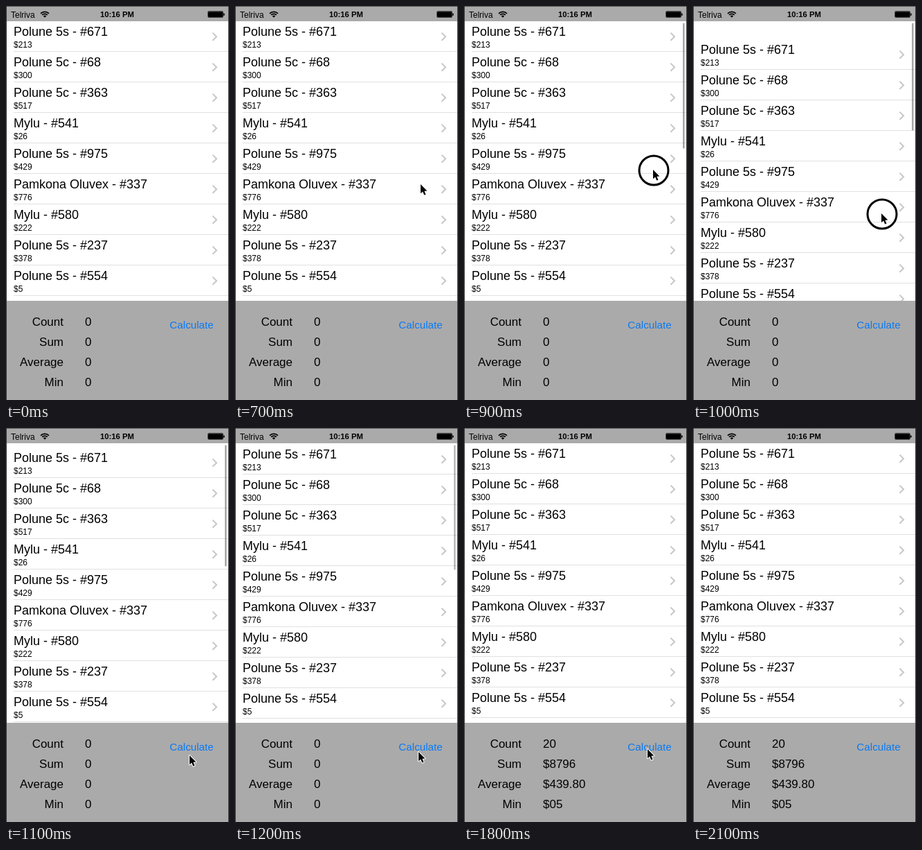
These frames come from a looping animation (322x568 px, 2.4 s). An HTML page with a canvas:

```html
<!DOCTYPE html>
<html lang="en">
<head>
<meta charset="utf-8">
<title>Price list</title>
<style>
html, body { margin: 0; width: 322px; height: 568px; overflow: hidden; background: #fff; }
canvas { display: block; }
</style>
</head>
<body>
<canvas id="stage" width="322" height="568"></canvas>
<script>
const ctx = document.getElementById('stage').getContext('2d');
const W = 322, H = 568, LOOP = 2400, STEP = 100;
const TOP = 22, BOTTOM = 425, ROW = 44;
const GRAY = '#aaaaaa', EDGE = '#303030';
const FONT = '"Liberation Sans", Arial, sans-serif';

const rows = [
  ['Polune 5s - #671', 213],
  ['Polune 5c - #68', 300],
  ['Polune 5c - #363', 517],
  ['Mylu - #541', 26],
  ['Polune 5s - #975', 429],
  ['Pamkona Oluvex - #337', 776],
  ['Mylu - #580', 222],
  ['Polune 5s - #237', 378],
  ['Polune 5s - #554', 5],
  ['Pamkona Oluvex - #794', 654],
  ['Polune 5s - #799', 481]
];
const labels = ['Count', 'Sum', 'Average', 'Min'];
const results = ['20', '$8796', '$439.80', '$05'];

// Each pose holds until the next: time, pointer, scroll, pressed, scrollbar opacity
const poses = [
  { t: 0 },
  { t: 600, at: [272, 512] },
  { t: 700, at: [268, 257] },
  { t: 800, at: [273, 174], scroll: 62, ring: true, bar: 1 },
  { t: 900, at: [273, 236], scroll: 0, ring: true, bar: 1 },
  { t: 1000, at: [272, 299], scroll: -26, ring: true, bar: 1 },
  { t: 1100, at: [265, 472], scroll: -6, bar: 1 },
  { t: 1200, at: [265, 467], scroll: -1, bar: 0.8 },
  { t: 1300, at: [265, 463], bar: 0.4 },
  { t: 1400, at: [265, 463] },
  { t: 1900, at: [274, 455] },
  { t: 2000, at: [288, 442] },
  { t: 2100 }
];

function text(str, x, y, size, color = '#000', align = 'left', weight = '') {
  ctx.font = `${weight} ${size}px ${FONT}`;
  ctx.textAlign = align;
  ctx.fillStyle = color;
  ctx.fillText(str, x, y);
}

function box(x, y, w, h, color) {
  ctx.fillStyle = color;
  ctx.fillRect(x, y, w, h);
}

function pill(x, y, w, h, r, color) {
  ctx.beginPath();
  ctx.roundRect(x, y, w, h, r);
  ctx.fillStyle = color;
  ctx.fill();
}

function drawRow([name, price], y) {
  text(name, 11, y + 21, 18);
  text('$' + price, 11, y + 38, 12);
  box(11, y + 43, 310, 1, '#e0e0e2');
  ctx.beginPath();
  ctx.moveTo(298.4, y + 16.6);
  ctx.lineTo(304, y + 22.2);
  ctx.lineTo(298.4, y + 27.8);
  ctx.strokeStyle = '#c7c7cc';
  ctx.lineWidth = 2;
  ctx.stroke();
}

function drawList(scroll, bar) {
  ctx.save();
  ctx.beginPath();
  ctx.rect(0, TOP, W, BOTTOM - TOP);
  ctx.clip();
  rows.forEach((row, i) => drawRow(row, TOP + i * ROW - scroll));
  if (bar) {
    const top = 24.5 + Math.max(0, scroll) * (BOTTOM - TOP) / (20 * ROW);
    const len = 181 + Math.min(0, scroll);
    pill(316, top, 2.5, len, 1.25, `rgba(0,0,0,${0.35 * bar})`);
  }
  ctx.restore();
}

function drawStatus() {
  box(0, 0, W, TOP, GRAY);
  text('Telriva', 7, 16.5, 12);
  text('10:16 PM', 160.5, 16, 11.3, '#000', 'center', 'bold');

  const a = -Math.PI * 0.75, b = -Math.PI * 0.25;
  ctx.strokeStyle = ctx.fillStyle = '#000';
  ctx.lineWidth = 1.8;
  for (const r of [8.4, 5.4]) {
    ctx.beginPath();
    ctx.arc(56, 16.8, r, a, b);
    ctx.stroke();
  }
  ctx.beginPath();
  ctx.moveTo(56, 16.8);
  ctx.arc(56, 16.8, 3.2, a, b);
  ctx.fill();

  ctx.beginPath();
  ctx.roundRect(291.5, 7.5, 22, 9, 1.5);
  ctx.strokeStyle = 'rgba(0,0,0,0.6)';
  ctx.lineWidth = 1;
  ctx.stroke();
  pill(292, 8.2, 21, 7.8, 1, '#000');
  pill(314, 10.5, 1.5, 3.5, 0.7, '#000');
}

function drawPanel(t) {
  box(0, BOTTOM, W, H - BOTTOM, GRAY);
  labels.forEach((label, i) => {
    const y = 461 + i * 29;
    text(label, 83, y, 17, '#000', 'right');
    text(t >= 1600 ? results[i] : '0', 114, y, 17);
  });
  ctx.globalAlpha = t === 1500 ? 0.22 : t === 1600 ? 0.65 : 1;
  text('Calculate', 268, 465, 15.2, '#0a7af5', 'center');
  ctx.globalAlpha = 1;
}

function drawPointer([x, y], ring) {
  if (ring) {
    ctx.beginPath();
    ctx.arc(x + 1, y + 1, 21, 0, Math.PI * 2);
    ctx.strokeStyle = '#000';
    ctx.lineWidth = 3;
    ctx.stroke();
  }
  ctx.beginPath();
  ctx.moveTo(x, y);
  ctx.lineTo(x, y + 13.3);
  ctx.lineTo(x + 3.1, y + 10.5);
  ctx.lineTo(x + 5.2, y + 15.6);
  ctx.lineTo(x + 7.5, y + 14.7);
  ctx.lineTo(x + 5.4, y + 9.7);
  ctx.lineTo(x + 9.4, y + 9.5);
  ctx.closePath();
  ctx.lineJoin = 'round';
  ctx.strokeStyle = '#fff';
  ctx.lineWidth = 2;
  ctx.stroke();
  ctx.fillStyle = '#000';
  ctx.fill();
  ctx.lineJoin = 'miter';
}

function draw(time) {
  const t = Math.floor((time % LOOP) / STEP) * STEP;
  const { at, scroll = 0, ring, bar = 0 } = poses.findLast(p => p.t <= t);
  box(0, 0, W, H, '#fff');
  drawList(scroll, bar);
  drawStatus();
  drawPanel(t);
  box(0, 0, W, 1, '#555');
  box(0, 0, 1, H, EDGE);
  box(321, 0, 1, H, EDGE);
  if (at) drawPointer(at, ring);
}

const start = performance.now();
function tick() {
  draw(performance.now() - start);
  requestAnimationFrame(tick);
}
tick();
</script>
</body>
</html>
```
